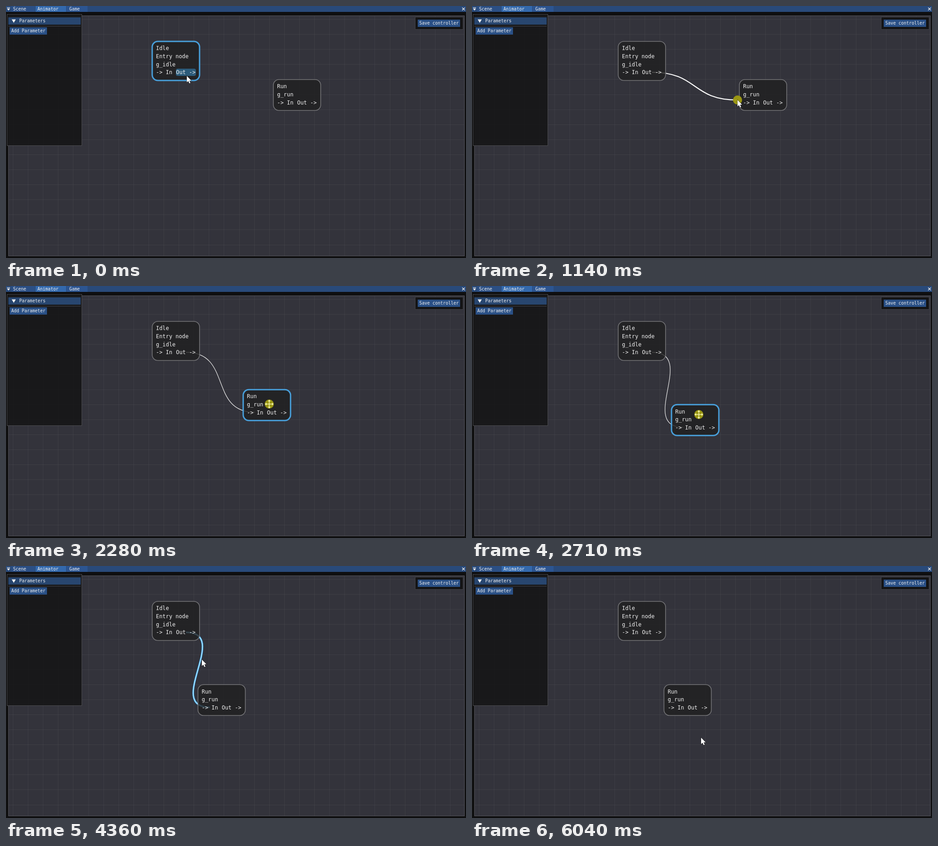
Animation of 1010x555 px, one loop 6180 ms. Source, as an HTML page with a canvas:

```html
<!DOCTYPE html>
<html lang="en">
<head>
<meta charset="utf-8">
<title>Animator node editor</title>
<style>
html, body { margin: 0; width: 100%; height: 100%; overflow: hidden; background: #0f0f10; }
canvas { display: block; width: 1010px; height: 555px; }
</style>
</head>
<body>
<canvas id="stage" width="1010" height="555"></canvas>
<script>
const ctx = document.getElementById('stage').getContext('2d');
const LOOP = 6180, STEP = 47.2;
const GRID = 33.1, SNAP = GRID / 2;
const UI = 9.6, NODE = 11.9;

// Pointer path: [step, x, y]
const path = [
  [0, 397, 154], [2, 397, 154], [6, 402, 146], [8, 402, 146],
  [21, 565, 197], [24, 583, 207], [27, 606, 212], [29, 606, 212],
  [35, 664, 199], [40, 648, 188], [42, 648, 188],
  [48, 578, 260], [55, 505, 278], [57, 498, 283], [61, 487, 285],
  [72, 487, 285], [85, 430, 206], [98, 430, 206], [112, 503, 378], [131, 503, 378]
];
// Steps during which the mouse button is held
const presses = [[9, 29], [40, 62], [86, 89], [126, 128]];
const DRAG = 42, DROP = 62, LINKED = 29, MENU = 93, CLOSED = 128;

const clamp = (v, a, b) => Math.min(b, Math.max(a, v));

function slope(i, k) {
  const a = path[i - 1], p = path[i], b = path[i + 1];
  const still = q => !q || (q[1] === p[1] && q[2] === p[2]);
  return still(a) || still(b) ? 0 : (b[k] - a[k]) / (b[0] - a[0]);
}

function pointer(n) {
  let i = 0;
  while (i < path.length - 2 && n > path[i + 1][0]) i++;
  const a = path[i], b = path[i + 1], d = b[0] - a[0], u = (n - a[0]) / d;
  const at = k => {
    const rise = u * u * (3 - 2 * u);
    return a[k] + (b[k] - a[k]) * rise
      + d * u * (1 - u) * ((1 - u) * slope(i, k) - u * slope(i + 1, k));
  };
  return { x: at(1), y: at(2) };
}

function rect(x, y, w, h, fill, stroke) {
  if (fill) { ctx.fillStyle = fill; ctx.fillRect(x, y, w, h); }
  if (stroke) {
    ctx.strokeStyle = stroke; ctx.lineWidth = 1;
    ctx.strokeRect(x + 0.5, y + 0.5, w - 1, h - 1);
  }
}

function poly(points, fill) {
  ctx.beginPath();
  points.forEach(p => ctx.lineTo(p[0], p[1]));
  ctx.closePath();
  ctx.fillStyle = fill;
  ctx.fill();
}

function text(s, x, mid, size = UI) {
  ctx.font = size + 'px "DejaVu Sans Mono", monospace';
  ctx.fillStyle = '#f2f2f2';
  ctx.fillText(s, x, mid + size * 0.36);
}

function button(s, x, y, w, h = 16) {
  rect(x, y, w, h, '#2a5086');
  text(s, x + 3.5, y + h / 2);
}

const inside = (p, x, y, w, h) => p.x >= x && p.x < x + w && p.y >= y && p.y < y + h;

function canvasArea() {
  rect(0, 0, 1010, 555, '#0f0f10');
  rect(5, 21, 1002, 530, '#33333b', '#56565c');
  ctx.fillStyle = 'rgba(120,120,120,0.16)';
  for (let x = 15; x < 1006; x += GRID) ctx.fillRect(Math.round(x), 22, 1, 528);
  for (let y = 29; y < 550; y += GRID) ctx.fillRect(6, Math.round(y), 1000, 1);
}

function panels() {
  rect(0, 0, 1010, 13, '#294a7a');
  rect(12, 0, 52, 13, '#2b4f85');
  rect(65, 0, 67, 13, '#3369ad');
  rect(133, 0, 46, 13, '#2c5591');
  rect(2, 3, 7, 1, '#f2f2f2');
  poly([[2, 5.5], [9, 5.5], [5.5, 10]], '#f2f2f2');
  text('Scene', 15.5, 7);
  text('Animator', 69, 7);
  text('Game', 139, 7);
  ctx.strokeStyle = '#f2f2f2';
  ctx.lineWidth = 1.2;
  ctx.beginPath();
  ctx.moveTo(1001.5, 3.5); ctx.lineTo(1007.5, 9.5);
  ctx.moveTo(1007.5, 3.5); ctx.lineTo(1001.5, 9.5);
  ctx.stroke();

  rect(2, 18, 165, 290, 'rgba(18,18,18,0.8)', '#4c4c50');
  rect(5, 25, 159, 16, '#28466f');
  poly([[12.5, 29.5], [21.5, 29.5], [17, 37]], '#f2f2f2');
  text('Parameters', 29, 33);
  rect(5, 44, 159, 1, '#434347');
  button('Add Parameter', 8, 47, 82);

  rect(898, 24, 106, 28, 'rgba(18,18,19,0.93)', '#424247');
  button('Save controller', 904, 30, 93);
}

function pin(p, x, y, w) {
  if (!inside(p, x, y - 8, w, 16)) return;
  ctx.beginPath();
  ctx.roundRect(x, y - 8, w, 16, 4);
  ctx.fillStyle = 'rgba(60,180,255,0.39)';
  ctx.fill();
}

function node(x, y, h, lines, hot, p) {
  ctx.beginPath();
  ctx.roundRect(x, y, 104, h, 12.4);
  ctx.fillStyle = 'rgba(32,32,32,0.8)';
  ctx.fill();
  ctx.strokeStyle = hot ? '#489fda' : '#747477';
  ctx.lineWidth = hot ? 3 : 1.6;
  ctx.stroke();
  lines.forEach((s, i) => text(s, x + 8.3, y + 15 + i * 17.7, NODE));
  const row = y + 15 + lines.length * 17.7;
  if (p) {
    pin(p, x + 8, row, 37);
    pin(p, x + 52, row, 44);
  }
  text('-> In', x + 8.3, row, NODE);
  text('Out ->', x + 52.3, row, NODE);
}

function link(ax, ay, bx, by, dragging, hot) {
  const half = Math.hypot(bx - ax, by - ay) / 2;
  const pull = 102 * (half < 102 ? Math.sin(Math.PI / 2 * half / 102) : 1);
  ctx.beginPath();
  ctx.moveTo(ax, ay);
  ctx.bezierCurveTo(ax + pull, ay, bx - pull, by, bx, by);
  if (hot) {
    ctx.strokeStyle = '#43b4fb';
    ctx.lineWidth = 3.6;
    ctx.stroke();
  }
  ctx.strokeStyle = hot ? '#d4efff' : dragging ? '#fff' : '#e2e2e2';
  ctx.lineWidth = dragging ? 2.2 : 1.3;
  ctx.stroke();
}

function menu(p) {
  rect(431, 207, 263, 183, '#141415', '#48484c');
  for (const y of [227, 244, 262, 265, 326, 348, 370]) rect(434, y, 257, 1, '#434347');
  text('Bool Conditions', 437, 218.5);
  text('Float Conditions', 437, 236);
  text('Int Conditions', 437, 253.5);
  button('Add bool Condition', 437, 269, 111, 15);
  button('Add float Condition', 437, 288, 116, 15);
  button('Add int Condition', 437, 307, 105, 15);
  rect(437, 330, 172, 15, '#1e3152');
  text('0.250', 440.5, 337.5);
  text('Blend value:', 612.5, 337.5);
  rect(437, 352, 15, 15, '#1e3152');
  text('End:', 456, 360);
  if (inside(p, 434, 371, 257, 16)) rect(434, 372, 257, 14, '#3a7ccf');
  text('Delete Transition', 437, 379.5);
}

function arrow() {
  ctx.beginPath();
  [[0, 0], [0, 14.2], [3.2, 11.3], [5.6, 16.6], [7.9, 15.6], [5.6, 10.4], [10, 10.2]]
    .forEach(q => ctx.lineTo(q[0], q[1]));
  ctx.closePath();
  ctx.strokeStyle = 'rgba(0,0,0,0.55)';
  ctx.lineWidth = 1.2;
  ctx.stroke();
  ctx.fillStyle = '#fff';
  ctx.fill();
}

function moveCross() {
  for (let i = 0; i < 4; i++) {
    rect(-0.7, -8, 1.4, 8, '#f8f8b4');
    poly([[0, -9.5], [3, -6], [-3, -6]], '#f8f8b4');
    ctx.rotate(Math.PI / 2);
  }
}

function cursor(p, n) {
  ctx.save();
  ctx.translate(p.x, p.y);
  if (presses.some(([a, b]) => n >= a && n < b)) {
    ctx.beginPath();
    ctx.arc(0, 0, 10, 0, Math.PI * 2);
    ctx.fillStyle = 'rgba(160,156,18,0.95)';
    ctx.fill();
  }
  if (n > DRAG && n < DROP) moveCross();
  else arrow();
  ctx.restore();
}

function draw(n) {
  const p = pointer(n), grab = pointer(DRAG), held = pointer(clamp(n, DRAG, DROP));
  const snap = d => Math.round(d / SNAP) * SNAP;
  const runX = 587 + snap(held.x - grab.x), runY = 162 + snap(held.y - grab.y);
  const open = n >= MENU && n < CLOSED;
  const linking = n > 8 && n < LINKED;
  const over = (x, y, h) => !open && inside(p, x, y, 104, h);

  canvasArea();
  if (linking) link(395, 146, p.x, p.y, true, false);
  else if (n >= LINKED && n < CLOSED) {
    link(395, 146, runX + 26, runY + 50, false, n >= 84 && n < MENU);
  }
  const free = open ? null : p;
  node(321, 78, 86, ['Idle', 'Entry node', 'g_idle'], over(321, 78, 86), free);
  node(runX, runY, 68, ['Run', 'g_run'],
    over(runX, runY, 68) || (n > DRAG && n < DROP), free);
  panels();
  if (open) menu(p);
  cursor(p, n);
}

function tick(now) {
  draw(Math.floor((now % LOOP + 4) / STEP));
  requestAnimationFrame(tick);
}
requestAnimationFrame(tick);
</script>
</body>
</html>
```
